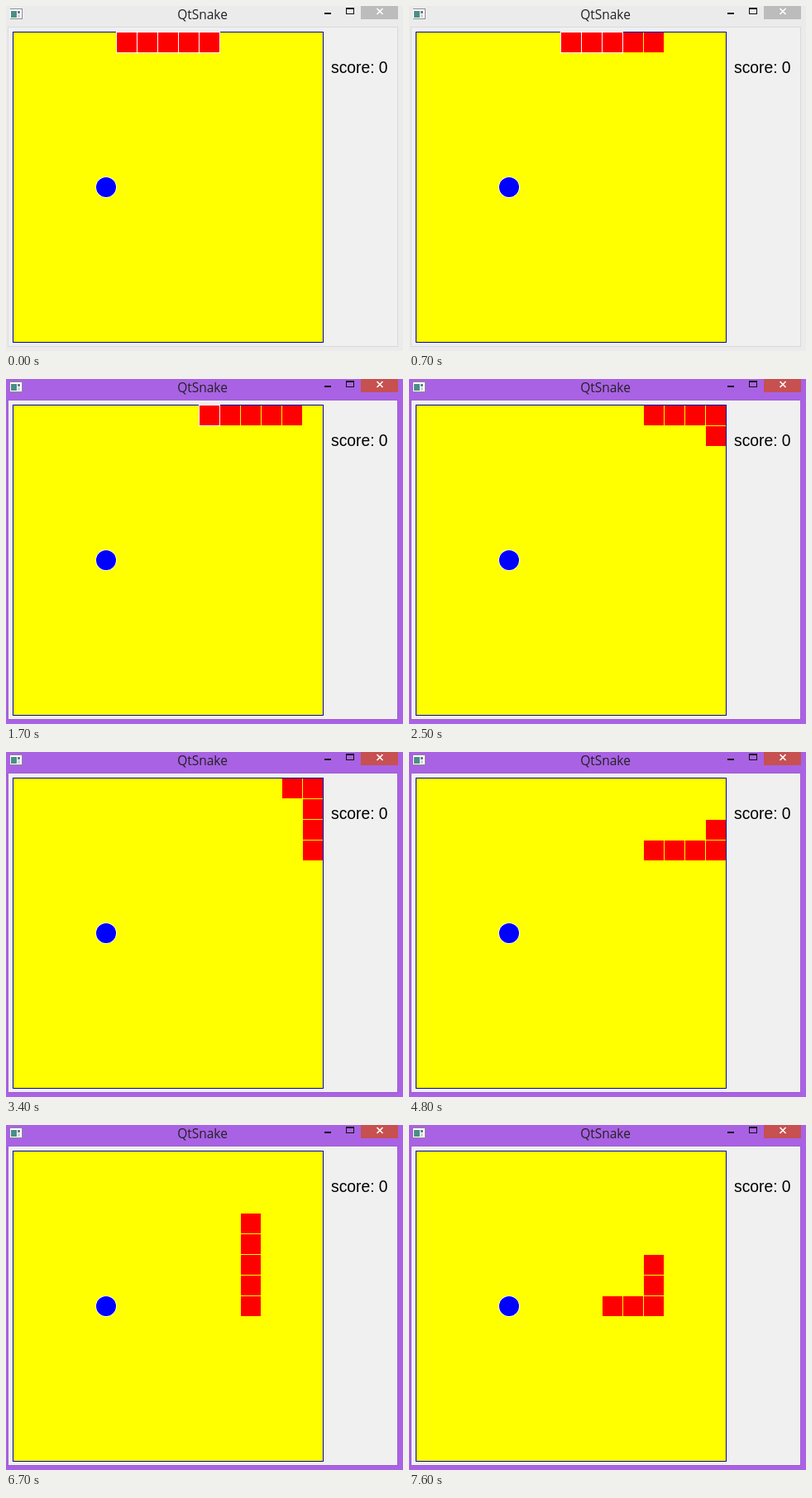
An HTML page for the animation above (8 s loop, 480 by 417 pixels).

```html
<!DOCTYPE html>
<html lang="en">
<head>
<meta charset="utf-8">
<title>QtSnake</title>
<style>
  html, body { margin: 0; width: 100%; height: 100%; overflow: hidden; }
  svg { display: block; --frame: #ebebeb; --edge: #dadada; --close: #bcbcbc; }
  svg.active { --frame: #a962e3; --edge: #a05cd0; --close: #c75050; }
  .frame { fill: var(--frame); }
  .client { fill: #f0f0f0; stroke: var(--edge); }
  .close { fill: var(--close); }
  .title { font: 15.5px "Open Sans", "Noto Sans", sans-serif; fill: #222; }
  .score { font: 19.3px "Liberation Sans", Arial, sans-serif; }
</style>
</head>
<body>
<svg id="win" width="480" height="417" viewBox="0 0 480 417">
  <rect class="frame" width="480" height="417"/>
  <rect class="client" x="2.5" y="25.5" width="471" height="386"/>

  <g shape-rendering="crispEdges">
    <rect x="5" y="3" width="15" height="13" fill="#8c8c8c"/>
    <rect x="5" y="4" width="14" height="11" fill="#fff"/>
    <rect x="6" y="6" width="7" height="8" fill="#4b8f86"/>
    <rect x="14" y="6" width="3" height="3" fill="#6a7d9a"/>
    <rect x="14" y="10" width="3" height="4" fill="#d5d5d5"/>
    <rect x="385" y="8" width="8" height="2" fill="#111"/>
    <path d="M411 2h10v8h-10zM412 4v5h8v-5z" fill="#111" fill-rule="evenodd"/>
    <rect class="close" x="429" width="45" height="16"/>
  </g>
  <path d="M448.5 3l7 7m0-7l-7 7" stroke="#fff" stroke-width="1.7"/>
  <text class="title" x="237.5" y="16" text-anchor="middle">QtSnake</text>
  <text class="score" x="393" y="81">score: 0</text>

  <rect x="8.5" y="31.5" width="375" height="375" fill="#ff0" stroke="#0000c0"/>
  <circle cx="121" cy="219" r="12.8" fill="#fff"/>
  <circle cx="121" cy="219" r="12" fill="#00f"/>
  <path id="outline" fill="#fff" shape-rendering="crispEdges"/>
  <path id="body" fill="#f00" shape-rendering="crispEdges"/>
</svg>
<script>
const LOOP = 8000, CELL = 25, LENGTH = 5, ACTIVE_AT = 1700;
const steps = [300, 700, 1200, 1600, 2100, 2500, 3000, 3400, 3900,
  4400, 4800, 5300, 5700, 6200, 6700, 7100, 7600];

// Route of the head in grid cells: direction and number of cells
const path = [[5, 0]];
for (const [dx, dy, count] of [[1, 0, 9], [0, 1, 3], [-1, 0, 3], [0, 1, 4], [-1, 0, 2]])
  for (let i = 0; i < count; i++) {
    const [x, y] = path[path.length - 1];
    path.push([x + dx, y + dy]);
  }

const square = ([col, row], inset, size) =>
  `M${8 + col * CELL + inset} ${31 + row * CELL + inset}h${size}v${size}h${-size}z`;

const win = document.getElementById("win");
const outline = document.getElementById("outline");
const body = document.getElementById("body");

function draw(now) {
  const t = now % LOOP;
  const n = steps.filter(s => s <= t).length;
  const cells = path.slice(n, n + LENGTH);
  // Only the cells present at the start carry a white outline
  const first = cells.slice(0, Math.max(0, LENGTH - n));
  win.classList.toggle("active", t >= ACTIVE_AT);
  outline.setAttribute("d", first.map(c => square(c, 0, CELL + 1)).join(""));
  body.setAttribute("d", cells.map(c => square(c, 1, CELL - 1)).join(""));
}

const start = performance.now();
function tick() {
  draw(performance.now() - start);
  requestAnimationFrame(tick);
}
tick();
</script>
</body>
</html>
```
